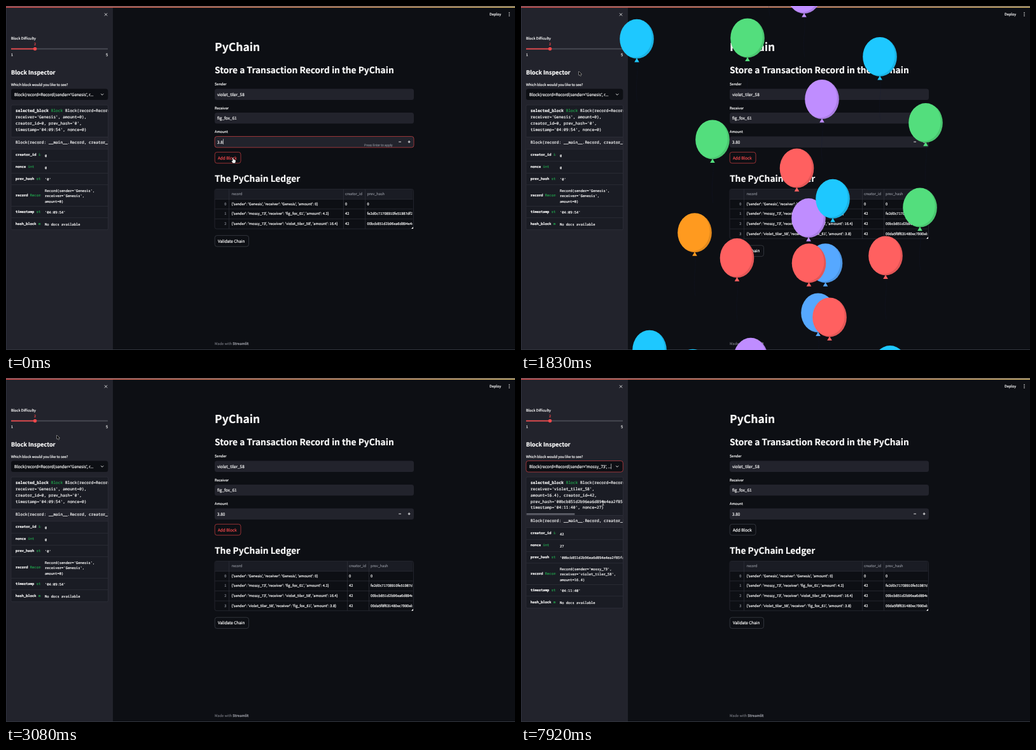
Animation, 800 px wide and 542 px high, one loop 8.01 s. Source, as an HTML page with a canvas:

```html
<!DOCTYPE html>
<html lang="en">
<head>
<meta charset="utf-8">
<title>PyChain</title>
<style>
  html, body { margin: 0; width: 100%; height: 100%; overflow: hidden; background: #0d0f14; }
  canvas { display: block; width: 800px; height: 542px; }
</style>
</head>
<body>
<canvas id="stage"></canvas>
<script>
const LOOP = 8010, FPS = 12;
const canvas = document.getElementById('stage');
const ctx = canvas.getContext('2d');
const dpr = window.devicePixelRatio || 1;
canvas.width = 800 * dpr;
canvas.height = 542 * dpr;

const sans = (px, weight = 400) =>
  `${weight} ${px}px "Noto Sans CJK JP", "Noto Sans CJK SC", "Noto Sans", sans-serif`;
const mono = (px, weight = 400) =>
  `${weight} ${px}px "Noto Sans Mono", "DejaVu Sans Mono", monospace`;
const BODY = sans(6.37), SMALL = sans(5.57), CELL = sans(5.65), H2 = sans(13.75, 700);
const CODE = 6.2, DOC = 5.45;
const MAIN = '#0d0f14', PANEL = '#22232c', MIX = '#1a1c24', LINE = '#33353f',
  EDGE = '#4a4d56', WHITE = '#fafafa', GREY = '#82858e', RED = '#f0484b', GREEN = '#21a04b';

// Moments of the interaction, in ms
const BLUR = 415, ADDED = 1000, OPEN1 = 3650, PICK1 = 5070, OPEN2 = 6830, PICK2 = 7660;

const blocks = [
  { sender: 'Genesis', receiver: 'Genesis', amount: 0, creator: 0, hash: '0', time: '04:09:54', nonce: 0 },
  { sender: 'mossy_73', receiver: 'fig_fox_61', amount: 4.2, creator: 42,
    hash: 'fe2d0c71708910fe51987df2e85886', time: '04:11:28', nonce: 44 },
  { sender: 'mossy_73', receiver: 'violet_tiler_58', amount: 16.4, creator: 42,
    hash: '00bcb851d2b96ea6d894e4ea2f85fa', time: '04:11:40', nonce: 27 },
  { sender: 'violet_tiler_58', receiver: 'fig_fox_61', amount: 3.8, creator: 42,
    hash: '00da5f8f631480ec7990eb' }
];
const options = ["Genesis', rece...", "mossy_73', rec...", "mossy_73', rec...", 'violet_tile...'];
const chosen = ["Genesis', r...", "mossy_73', ...", "mossy_73', ..."];

const colors = { b: '#1ec8ff', g: '#53de7d', p: '#bf8dff', o: '#ff9a1f', r: '#ff6060', s: '#56a8ff' };
// Centre x, launch time, colour
const balloons = [
  [390, 1101, 'o'], [445, 1146, 'p'], [182, 1197, 'b'], [356, 1196, 'g'], [564, 1218, 'b'],
  [473, 1270, 'p'], [627, 1418, 'g'], [636, 1300, 'g'], [301, 1322, 'g'], [433.5, 1361, 'r'],
  [452, 1434, 'p'], [490, 1405, 'b'], [273, 1457, 'o'], [339.5, 1499, 'r'], [478.5, 1508, 's'],
  [452.5, 1508, 'r'], [573, 1495, 'r'], [467, 1605, 's'], [485, 1615, 'r'], [202, 1704, 'b'],
  [361, 1733, 'p'], [580, 1773, 'b'], [270, 1807, 'b'], [227, 1845, 's'], [506, 1859, 'r'],
  [214, 1947, 'b'], [208, 1893, 'p'], [278, 1925, 's'], [442.5, 2003, 's'], [603.5, 2009, 'r']
];
const RISE = 740;

// Time, x, y of the pointer's hot spot
const path = [
  [0, 357, 239], [800, 355, 241], [1500, 355, 241], [1830, 91, 103], [2330, 80, 90], [3200, 80, 90],
  [3600, 146, 139], [4250, 145, 151], [4800, 143, 174], [6250, 143, 174],
  [6700, 146, 139], [7300, 129, 192], [7917, 129, 197]
];

// A hairline outline gives small type the weight of downscaled text
function text(s, x, y, font = BODY, color = WHITE, align = 'left') {
  ctx.font = font;
  ctx.fillStyle = ctx.strokeStyle = color;
  ctx.lineWidth = 0.2;
  ctx.textAlign = align;
  ctx.fillText(s, x, y);
  ctx.strokeText(s, x, y);
  return x + ctx.measureText(s).width;
}

function rect(x, y, w, h, color) {
  ctx.fillStyle = color;
  ctx.fillRect(x, y, w, h);
}

function box(x, y, w, h, fill, stroke, r = 3.5) {
  ctx.beginPath();
  ctx.roundRect(x, y, w, h, r);
  ctx.fillStyle = fill;
  ctx.fill();
  if (stroke) {
    ctx.strokeStyle = stroke;
    ctx.lineWidth = 0.6;
    ctx.stroke();
  }
}

function line(points, color, width, closed) {
  ctx.beginPath();
  points.forEach(([x, y]) => ctx.lineTo(x, y));
  if (closed) ctx.closePath();
  ctx.strokeStyle = color;
  ctx.lineWidth = width;
  ctx.stroke();
}

function dot(x, y, r, color) {
  ctx.beginPath();
  ctx.arc(x, y, r, 0, 7);
  ctx.fillStyle = color;
  ctx.fill();
}

function clipped(x, y, w, h, paint) {
  ctx.save();
  ctx.beginPath();
  ctx.rect(x, y, w, h);
  ctx.clip();
  paint();
  ctx.restore();
}

function wrap(words, limit) {
  const lines = [''];
  for (const word of words) {
    const last = lines.length - 1;
    const joined = lines[last] ? lines[last] + ' ' + word : word;
    if (joined.length <= limit || !lines[last]) lines[last] = joined;
    else lines.push(word);
  }
  return lines;
}

function header() {
  const g = ctx.createLinearGradient(0, 0, 800, 0);
  g.addColorStop(0, '#d9504f');
  g.addColorStop(1, '#dfc070');
  rect(0, 0, 800, 1, '#55535f');
  rect(0, 1, 800, 1.6, g);
  rect(0, 541, 800, 1, '#32353d');
  text('Deploy', 760, 15.2, SMALL);
  [10.6, 13, 15.4].forEach(y => dot(791, y, 0.75, WHITE));
}

function inspector(b) {
  const code = wrap([`receiver='${b.receiver}',`, `amount=${b.amount}),`, `creator_id=${b.creator},`,
    `prev_hash='${b.hash}',`, `timestamp='${b.time}',`, `nonce=${b.nonce})`], 38);
  const shift = code.length > 3 ? 10 : 0;
  box(8, 156, 152.5, 196.5 + shift, MIX, LINE, 2);
  clipped(8.4, 156, 151.8, 200 + shift, () => {
    let x = text('selected_block ', 15, 167, mono(CODE, 700));
    x = text('Block ', x, 167, mono(CODE), GREEN);
    text(`Block(record=Record(sender='${b.sender}',`, x, 167, mono(CODE));
    code.forEach((s, i) => text(s, 15, 177 + i * 9.8, mono(CODE)));
    if (shift) rect(8.4, 213, 76, 2.8, '#5b5d66');
    ctx.translate(0, shift);
    rect(8.4, 206, 152, 19.5, PANEL);
    text('Block(record: __main__.Record, creator_id: int)', 15, 217.2, mono(CODE));
    [206, 225.5, 244.5, 263, 281.5, 315, 333.5].forEach(y => rect(8, y, 152, 0.6, LINE));
    const rows = [
      ['creator_id', 'int', 236, b.creator], ['nonce', 'int', 255, b.nonce],
      ['prev_hash', 'str', 273.6, `'${b.hash}'`],
      ['record', 'Record', 299.7, `Record(sender='${b.sender}',`, `receiver='${b.receiver}',`, `amount=${b.amount})`],
      ['timestamp', 'str', 325.8, `'${b.time}'`], ['hash_block', 'method', 344.6, 'No docs available']
    ];
    for (const [name, type, y, ...values] of rows) {
      clipped(8, y - 9, 46.5, 14, () => {
        const end = text(name + ' ', 15, y, mono(DOC, 700));
        text(type, end, y, mono(DOC), GREEN);
      });
      const top = values.length > 1 ? y - 7.2 : y + 1.5;
      values.forEach((v, i) => text(v, 61, top + i * 8.5, mono(DOC)));
    }
  });
}

function dropdown(active) {
  box(8, 148.5, 152.5, 71, MAIN, null, 3);
  rect(8, 148.8 + active * 17.9, 152.5, 17.4, PANEL);
  options.forEach((s, i) => text(`Block(record=Record(sender='${s}`, 15, 159.6 + i * 17.9));
}

function sidebar(t) {
  const open = (t >= OPEN1 && t < PICK1) || (t >= OPEN2 && t < PICK2);
  const index = t < PICK1 ? 0 : t < PICK2 ? 1 : 2;
  rect(0, 0, 168, 542, PANEL);
  rect(0, 0, 0.7, 542, '#343845');
  line([[154.9, 11.3], [159.1, 15.5]], WHITE, 0.8);
  line([[159.1, 11.3], [154.9, 15.5]], WHITE, 0.8);
  text('Block Difficulty', 8, 53, SMALL);
  text('2', 45.6, 62.2, SMALL, RED, 'center');
  rect(8, 66.7, 152, 1.7, '#4b4d56');
  rect(8, 66.7, 37.6, 1.7, RED);
  dot(45.6, 67.5, 2.7, RED);
  text('1', 8, 79.3, SMALL);
  text('5', 160, 79.3, SMALL, WHITE, 'right');
  text('Block Inspector', 8, 107.7, sans(9.1, 700));
  text('Which block would you like to see?', 8, 125.5, SMALL);
  box(8, 130.5, 152.3, 17.6, MAIN, t >= OPEN1 ? RED : null);
  text(`Block(record=Record(sender='${chosen[index]}`, 13, 141.8);
  if (open || t >= PICK2) rect(141.5, 135, 0.6, 8.5, WHITE);
  line([[149.2, 138.3], [151.2, 140.3], [153.2, 138.3]], WHITE, 0.9);
  inspector(blocks[index]);
  if (open) dropdown(t < 4600 ? 0 : t < 7100 ? 1 : 2);
}

function ledger(count) {
  const added = count > 3;
  const colB = added ? 536 : 530, colC = added ? 570 : 564.5;
  const bottom = 304.3 + count * 15.6;
  box(328, 288.5, 312.5, bottom - 288.5, MAIN, LINE, 3);
  clipped(328.4, 288.9, 311, bottom - 289, () => {
    rect(328, 288, 313, 16, MIX);
    for (let i = 0; i < count; i++) rect(328, 304 + i * 15.6, 313, 0.6, LINE);
    [350, colB, colC].forEach(x => rect(x, 288, 0.6, 90, LINE));
    [['record', 354.5], ['creator_id', colB + 3], ['prev_hash', colC + 3]]
      .forEach(([s, x]) => text(s, x, 298.2, CELL, GREY));
    blocks.slice(0, count).forEach((b, i) => {
      const y = 313.9 + i * 15.55;
      text(i, 346.5, y, CELL, GREY, 'right');
      text(`{'sender': '${b.sender}', 'receiver': '${b.receiver}', 'amount': ${b.amount}}`, 354.5, y, CELL);
      text(b.creator, colB + 3, y, CELL);
      clipped(colC, 288, 638.5 - colC, 90, () => text(b.hash, colC + 3, y, CELL));
    });
  });
  ctx.beginPath();
  [[640, bottom - 3], [640, bottom], [637, bottom]].forEach(([x, y]) => ctx.lineTo(x, y));
  ctx.fillStyle = WHITE;
  ctx.fill();
}

function button(label, y, w, color, edge) {
  box(328.2, y, w, 17.4, MAIN, edge);
  text(label, 333, y + 11.2, BODY, color);
}

function content(t) {
  const editing = t < BLUR, added = t >= ADDED, hot = t < OPEN1;
  text('PyChain', 328, 71.3, sans(17.5, 700));
  text('Store a Transaction Record in the PyChain', 328, 106.4, H2);
  [['Sender', 'violet_tiler_58', 125.3], ['Receiver', 'fig_fox_61', 162.7],
    ['Amount', editing ? '3.8' : '3.80', 200.3]].forEach(([label, value, y], i) => {
    text(label, 328, y, SMALL);
    box(328, y + 5.2, 313, 17.4, PANEL, editing && i === 2 ? RED : null);
    text(value, 332, y + 16.3);
  });
  if (editing) {
    rect(341, 209.5, 0.6, 8.5, WHITE);
    text('Press Enter to apply', 607.5, 220.8, sans(4.8), GREY, 'right');
  }
  rect(617.2, 213.6, 3.8, 0.9, WHITE);
  rect(631.6, 213.6, 4, 0.9, WHITE);
  rect(633.15, 212, 0.9, 4, WHITE);
  button('Add Block', 230.3, 40.8, hot ? RED : WHITE, hot ? RED : EDGE);
  text('The PyChain Ledger', 328, 276.8, H2);
  ledger(added ? 4 : 3);
  button('Validate Chain', added ? 377.2 : 361.6, 53.3, WHITE, EDGE);
  const end = text('Made with ', 328, 534.2, SMALL, '#686a72');
  text('Streamlit', end, 534.2, sans(5.5, 700), '#8d8f97');
}

// cubic-bezier(.42, 0, 1, 1)
function easeIn(p) {
  let lo = 0, hi = 1;
  for (let i = 0; i < 20; i++) {
    const u = (lo + hi) / 2, v = 1 - u;
    if (1.26 * u * v * v + 3 * u * u * v + u ** 3 < p) lo = u; else hi = u;
  }
  return lo * lo * (3 - 2 * lo);
}

function balloon(x, y, color) {
  ctx.save();
  ctx.translate(x, y);
  ctx.beginPath();
  ctx.moveTo(0, 36);
  ctx.bezierCurveTo(4, 55, -4, 70, 1, 100);
  ctx.strokeStyle = 'rgba(20,30,60,.3)';
  ctx.lineWidth = 0.7;
  ctx.stroke();
  ctx.fillStyle = color;
  ctx.beginPath();
  ctx.moveTo(0, 30);
  ctx.lineTo(3.8, 36.6);
  ctx.lineTo(-3.8, 36.6);
  ctx.fill();
  ctx.beginPath();
  ctx.ellipse(0, 0, 26.8, 31, 0, 0, 7);
  ctx.fill();
  ctx.clip();
  // Shaded crescent on the right
  ctx.beginPath();
  ctx.rect(-32, -35, 64, 70);
  ctx.ellipse(-3, -2, 26.8, 31, 0, 0, 2 * Math.PI);
  ctx.fillStyle = 'rgba(0,0,0,.11)';
  ctx.fill('evenodd');
  ctx.restore();
}

function pointer(t) {
  let i = path.findIndex(k => k[0] > t);
  if (i < 0) i = path.length - 1;
  const [t0, x0, y0] = path[i - 1], [t1, x1, y1] = path[i];
  const p = Math.min(1, (t - t0) / (t1 - t0)), e = p * p * (3 - 2 * p);
  ctx.save();
  ctx.translate(x0 + (x1 - x0) * e, y0 + (y1 - y0) * e);
  ctx.lineJoin = 'round';
  const shape = (points, fill, edge) => {
    line(points, edge, 1, true);
    ctx.fillStyle = fill;
    ctx.fill();
  };
  if (t < 1600 || (t >= 3550 && t < PICK1) || (t >= 6600 && t < PICK2)) {
    shape([[-1, 0.2], [0, 0], [0.6, 3], [3, 3.5], [4, 4.4], [3.6, 7], [2.8, 8.5], [-0.4, 8.5],
      [-2.4, 5.6], [-2, 4.9], [-0.6, 5.6]], '#f4f4f4', '#111');
  } else if (t < 3550) {
    shape([[0, 0], [0, 6.2], [1.4, 5], [2.4, 7.2], [3.3, 6.8], [2.4, 4.6], [4.2, 4.5]], '#090909', '#d0d0d0');
  } else {
    line([[0, -3.2], [0, 3.2]], WHITE, 0.8);
    line([[-1.5, -3.6], [0, -3], [1.5, -3.6]], WHITE, 0.7);
    line([[-1.5, 3.6], [0, 3], [1.5, 3.6]], WHITE, 0.7);
  }
  ctx.restore();
}

function draw(now) {
  const step = Math.min(95, Math.floor((now % LOOP + 3.4) * FPS / 1000));
  const t = Math.floor(step * 100 / FPS) * 10;
  ctx.setTransform(dpr, 0, 0, dpr, 0, 0);
  ctx.textRendering = 'geometricPrecision';
  ctx.lineJoin = 'round';
  rect(0, 0, 800, 542, MAIN);
  content(t);
  sidebar(t);
  header();
  for (const [x, start, color] of balloons) {
    const p = (t - start) / RISE;
    if (p > 0 && p < 1) balloon(x, 573 - 675 * easeIn(p), colors[color]);
  }
  pointer(t);
}

const begin = performance.now();
function tick() {
  draw(performance.now() - begin);
  requestAnimationFrame(tick);
}
tick();
</script>
</body>
</html>
```
